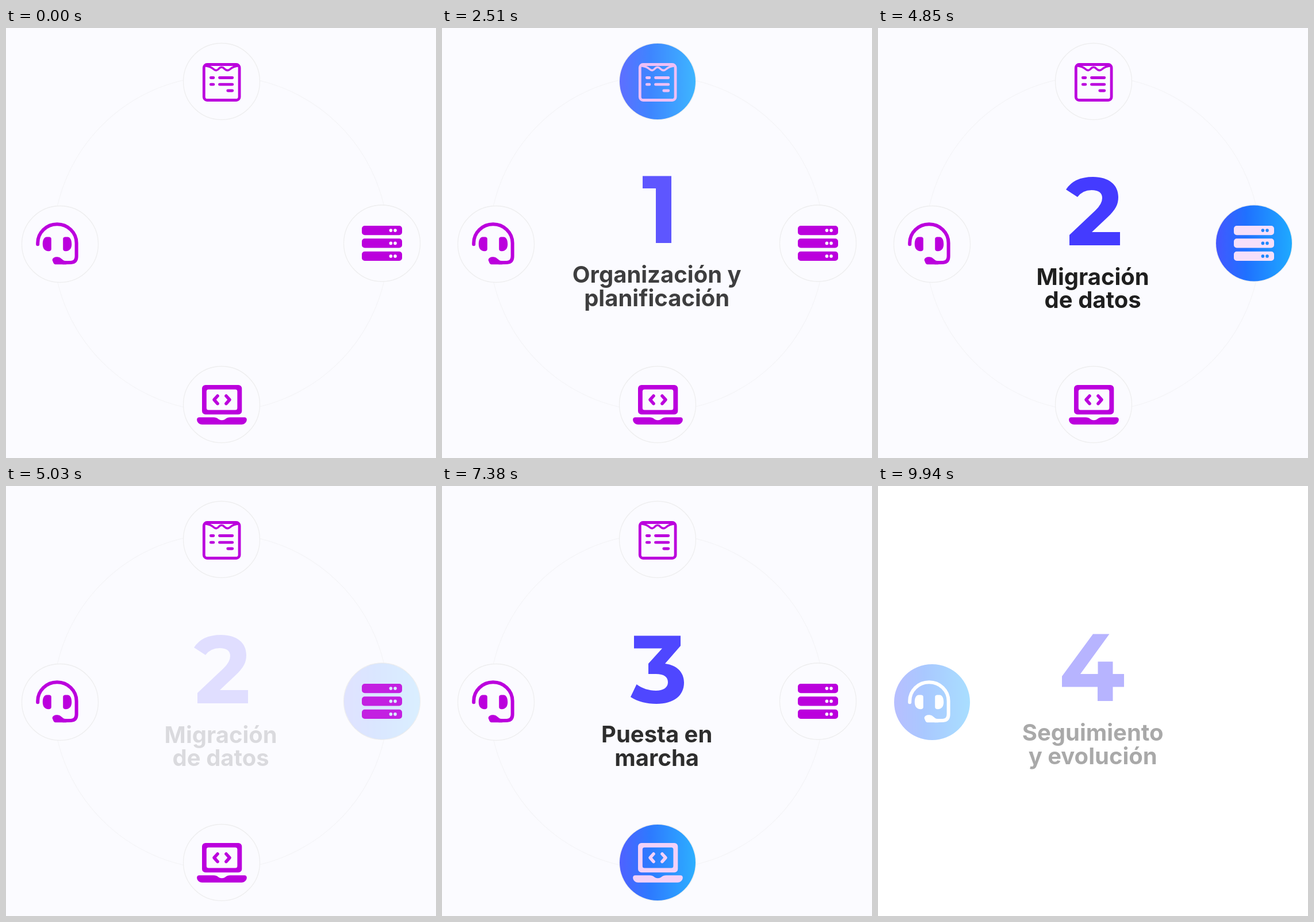
These frames come from a looping animation (748 px wide and 748 px high, 9.97 s). An HTML page:

```html
<!DOCTYPE html>
<html lang="es">
<head>
<meta charset="utf-8">
<title>Proceso en cuatro pasos</title>
<style>
  html, body { margin: 0; width: 100%; height: 100%; overflow: hidden; background: #fff; }
  svg { display: block; width: 100%; height: 100%; }
  text { font: 700 40px Inter, "Open Sans", sans-serif; text-anchor: middle; }
  .base { color: #bb00dd; }
  .step { color: #fff; }
  .fill { fill: currentColor; fill-rule: evenodd; }
  .line { fill: none; stroke: currentColor; stroke-linecap: round; stroke-linejoin: round; }
</style>
</head>
<body>
<svg id="stage" viewBox="0 0 748 748">
  <defs>
    <linearGradient id="blue">
      <stop offset="0" stop-color="#2a40ff"/>
      <stop offset=".4" stop-color="#005eff"/>
      <stop offset="1" stop-color="#009fff"/>
    </linearGradient>
  </defs>
</svg>
<script>
const LOOP = 9970, TICK = 30, BG = '#fbfbff';
const stage = document.getElementById('stage');

const fill = d => `<path class="fill" d="${d}"/>`;
const line = (d, w) => `<path class="line" stroke-width="${w}" d="${d}"/>`;
const box = (x, y, w, h, r) =>
  `M${x + r} ${y}h${w - 2 * r}a${r} ${r} 0 0 1 ${r} ${r}v${h - 2 * r}a${r} ${r} 0 0 1 ${-r} ${r}` +
  `h${2 * r - w}a${r} ${r} 0 0 1 ${-r} ${-r}v${2 * r - h}a${r} ${r} 0 0 1 ${r} ${-r}z`;
const dot = (x, y, r) => `M${x - r} ${y}a${r} ${r} 0 1 0 ${2 * r} 0a${r} ${r} 0 1 0 ${-2 * r} 0z`;

const planIcon =
  line(box(344.3, 63.5, 61.8, 62, 5.5), 4.8) +
  line('M348 66Q356 67 361 71.5Q366 76 370 71Q375 65.5 380 71Q385 76 390 71.5Q395 67 403 66', 3.6) +
  line('M356.3 86.5h4.6M371.5 86.5h22.3M356.3 98.2h4.6M371.5 98.2h22.3M385.8 109h8', 4.8);

const serverIcon = [344, 366.3, 388.8].map(y =>
  fill(box(619, y, 70, 16.2, 5) + dot(669.4, y + 8.1, 2.8) + dot(677, y + 8.1, 2.8))).join('');

const laptopIcon =
  fill(box(341, 621, 69.3, 51.3, 6) + box(348.8, 628.8, 53.6, 35.6, 3.5)) +
  line('M368 640L362 646.7L368 653.4M383 640L389 646.7L383 653.4', 5.6) +
  fill('M336 677.3H361C369 677.3 369 682.3 375.5 682.3C382 682.3 382 677.3 390 677.3H415' +
       'C422 677.3 419 689.8 410 689.8H341C332 689.8 329 677.3 336 677.3Z');

const ear = 'M71 363.6H75.5Q79 364 78.8 367.5V384.5Q78.6 388.4 74 388.3C67 388 63.8 383 63.8 376C63.8 369 66 364 71 363.6Z';
const headsetIcon =
  line('M55.2 376.3V374A33.7 32.8 0 0 1 122.6 374V397Q122.6 407.6 113 407.9L100 408.3', 6) +
  fill(ear) + `<g transform="translate(178 0) scale(-1 1)">${fill(ear)}</g>` +
  fill('M80.6 404C80.5 399.5 86 397.5 91 398.4C97 399.5 98 405.2 105 405.3V411.3H87C82.5 411.3 82.5 408 80.6 404Z');

const steps = [
  { name: '1', x: 375, y: 93, icon: planIcon, base: 443, lines: ['Organización y', 'planificación'],
    digit: 'M349 257.5H399V374H372V279H349Z' },
  { name: '2', x: 654, y: 374.5, icon: serverIcon, base: 446.5, lines: ['Migración', 'de datos'],
    digit: 'M421 355V378H333V360L378 317.5Q390 306 390 296Q390 282 371.5 282Q356 282 347 294L327 281' +
           'Q341 259 374 259C402 259 418 273 418 294C418 307 413.5 316 399 329.5L372 355Z' },
  { name: '3', x: 375, y: 655, icon: laptopIcon, base: 446, lines: ['Puesta en', 'marcha'],
    digit: 'M334 260.5H415V278L388 309C410 312 421 325 421 342C421 364 404 379 373 379' +
           'C356 379 340 375 328 367L338.5 345C348 352 360 356 372 356C385 356 393 350.5 393 341.5' +
           'C393 332 386 327 372 327H359V309L383 282.5H334Z' },
  { name: '4', x: 94, y: 376, icon: headsetIcon, base: 443, lines: ['Seguimiento', 'y evolución'],
    digit: 'M428 327V349.5H408.5V374H382V349.5H320V331L374 257.5H402.5L352 327H382.5V305.5H408.5V327Z' }
];

// Each change fades one step out over `out` ticks, then the next one in over `into` ticks.
const changes = [
  { at: 160, ticks: 4, out: 1, into: 4 },
  { at: 2510, ticks: 9, out: 4, into: 5 },
  { at: 4850, ticks: 13, out: 8, into: 5 },
  { at: 7380, ticks: 10, out: 5.5, into: 5 },
  { at: 9850, ticks: 4, out: 6, into: 1 }
];
const BASE_END = 9940;

const baseView = `<g id="base" class="base">
  <rect width="748" height="748" fill="${BG}"/>
  <circle cx="373.5" cy="375" r="291.5" fill="none" stroke="#f5f5f8" stroke-width="1.4"/>
  ${steps.map(s => `<circle cx="${s.x}" cy="${s.y}" r="66.5" fill="${BG}" stroke="#eeeeef" stroke-width="1.3"/>${s.icon}`).join('')}
</g>`;

const stepView = s => `<g class="step" opacity="0">
  <circle cx="${s.x}" cy="${s.y}" r="66" fill="url(#blue)"/>${s.icon}
  <path role="img" aria-label="${s.name}" fill="#2a20ff" d="${s.digit}"/>
  ${s.lines.map((t, i) => `<text x="373.7" y="${s.base + i * 40.7}">${t}</text>`).join('')}
</g>`;

stage.insertAdjacentHTML('beforeend', baseView + steps.map(stepView).join(''));
const base = document.getElementById('base');
const views = [...stage.querySelectorAll('.step')];
const clamp = v => Math.min(1, Math.max(0, v));

function tickOf(change, t) {
  return t < change.at ? 0 : Math.min(change.ticks, Math.floor((t - change.at) / TICK) + 1);
}

function alpha(i, t) {
  const a = changes[i], b = changes[i + 1];
  const shown = clamp((tickOf(a, t) - a.ticks + a.into) / a.into);
  return shown * clamp(1 - tickOf(b, t) / b.out);
}

function draw(t) {
  base.setAttribute('opacity', t < BASE_END ? 1 : 0);
  views.forEach((v, i) => v.setAttribute('opacity', alpha(i, t).toFixed(3)));
}

let start = null;
function frame(now) {
  if (start === null) start = now;
  draw((now - start) % LOOP);
  requestAnimationFrame(frame);
}
draw(0);
requestAnimationFrame(frame);
</script>
</body>
</html>
```
